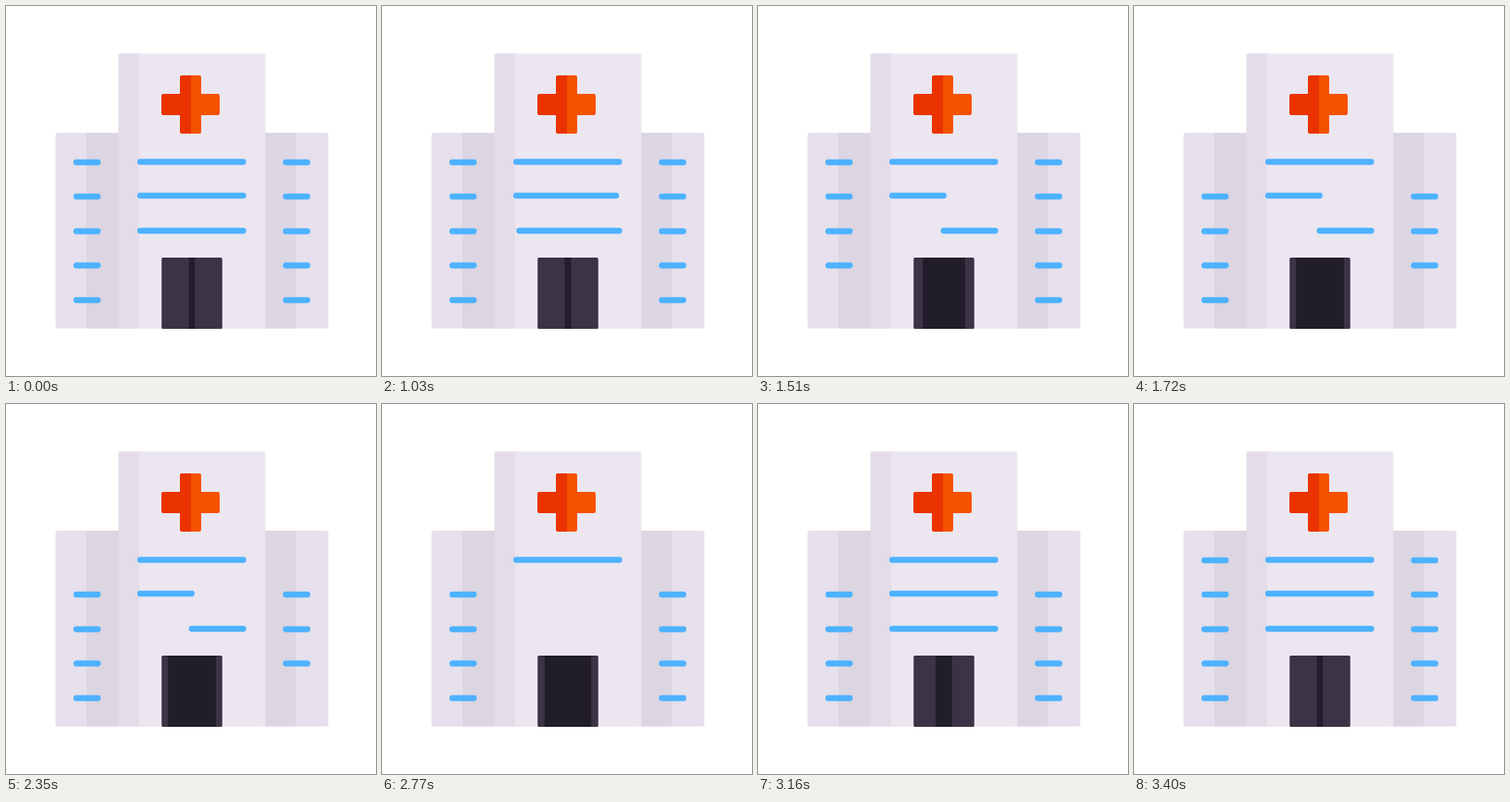
Write an HTML page that moves like this. It is 400 px wide and 400 px high and loops after 3430 ms.

```html
<!DOCTYPE html>
<html lang="en">
<head>
<meta charset="utf-8">
<title>Hospital</title>
<style>
  html, body { margin: 0; width: 100%; height: 100%; overflow: hidden; background: #fff; }
  svg { display: block; width: 100%; height: 100%; }
</style>
</head>
<body>
<svg viewBox="0 0 400 400">
  <rect x="53.5" y="137" width="295" height="211.5" rx="2" fill="#e5e0eb"/>
  <path d="M87 137h35v211.5H87zM279 137h34v211.5h-34z" fill="#dcd5e2"/>
  <rect x="121.5" y="51.5" width="159" height="297" rx="2" fill="#ebe6f0"/>
  <path d="M144 51.5h-20.500q-2 0-2 2v293q0 2 2 2H144z" fill="#e4dde9"/>
  <path d="M200 75h-10q-2 0-2 2v18h-18q-2 0-2 2v19q0 2 2 2h18v18q0 2 2 2h10z" fill="#eb3300"/>
  <path d="M200 75h9q2 0 2 2v18h18q2 0 2 2v19q0 2-2 2h-18v18q0 2-2 2h-9z" fill="#f55200"/>
  <rect x="168.500" y="272" width="65" height="77" rx="1.500" fill="#221d2a"/>
  <g fill="#3c3347">
    <rect id="leftLeaf" x="168.500" y="272" height="77" rx="1.500"/>
    <rect id="rightLeaf" y="272" height="77" rx="1.500"/>
  </g>
  <g id="lines" stroke="#4db2ff" stroke-width="6.300" stroke-linecap="round">
    <path d="M145 168.500H256.500"/>
    <path id="upper"/>
    <path id="lower"/>
  </g>
</svg>
<script>
const LOOP = 3430;
const $ = id => document.getElementById(id);

// Sine ease from 0 to 1 between two times
const ease = (t, from, to) => {
  const p = Math.min(1, Math.max(0, (t - from) / (to - from)));
  return (1 - Math.cos(Math.PI * p)) / 2;
};

// Hidden period of each blinking tick: column, row, start, end
const blinks = [
  [0, 4, 1255, 1570],
  [0, 0, 1600, 3190],
  [1, 0, 1600, 3190],
  [1, 4, 1600, 2680]
];

const ticks = [76, 302.5].map(x => [169, 206, 243.5, 280.5, 318].map(y => {
  const tick = document.createElementNS('http://www.w3.org/2000/svg', 'path');
  tick.setAttribute('d', `M${x} ${y}h23.300`);
  $('lines').append(tick);
  return tick;
}));

function draw(t) {
  const length = 111.5 * (1 - ease(t, 1003, 1255) + 0.5 * ease(t, 1255, 1515)
    - 0.5 * ease(t, 2630, 2768) + ease(t, 2770, 3028));
  const shown = length > 0.5;
  $('upper').setAttribute('d', shown ? `M145 205h${length}` : '');
  $('lower').setAttribute('d', shown ? `M256.500 243h${-length}` : '');

  const leaf = 29.3 - 22.6 * (ease(t, 1000, 1670) - ease(t, 2700, 3390));
  $('leftLeaf').setAttribute('width', leaf);
  $('rightLeaf').setAttribute('width', leaf);
  $('rightLeaf').setAttribute('x', 233.5 - leaf);

  for (const [column, row, start, end] of blinks) {
    ticks[column][row].style.display = t >= start && t < end ? 'none' : '';
  }
}

const begin = performance.now();
function frame() {
  draw((performance.now() - begin) % LOOP);
  requestAnimationFrame(frame);
}
frame();
</script>
</body>
</html>
```
